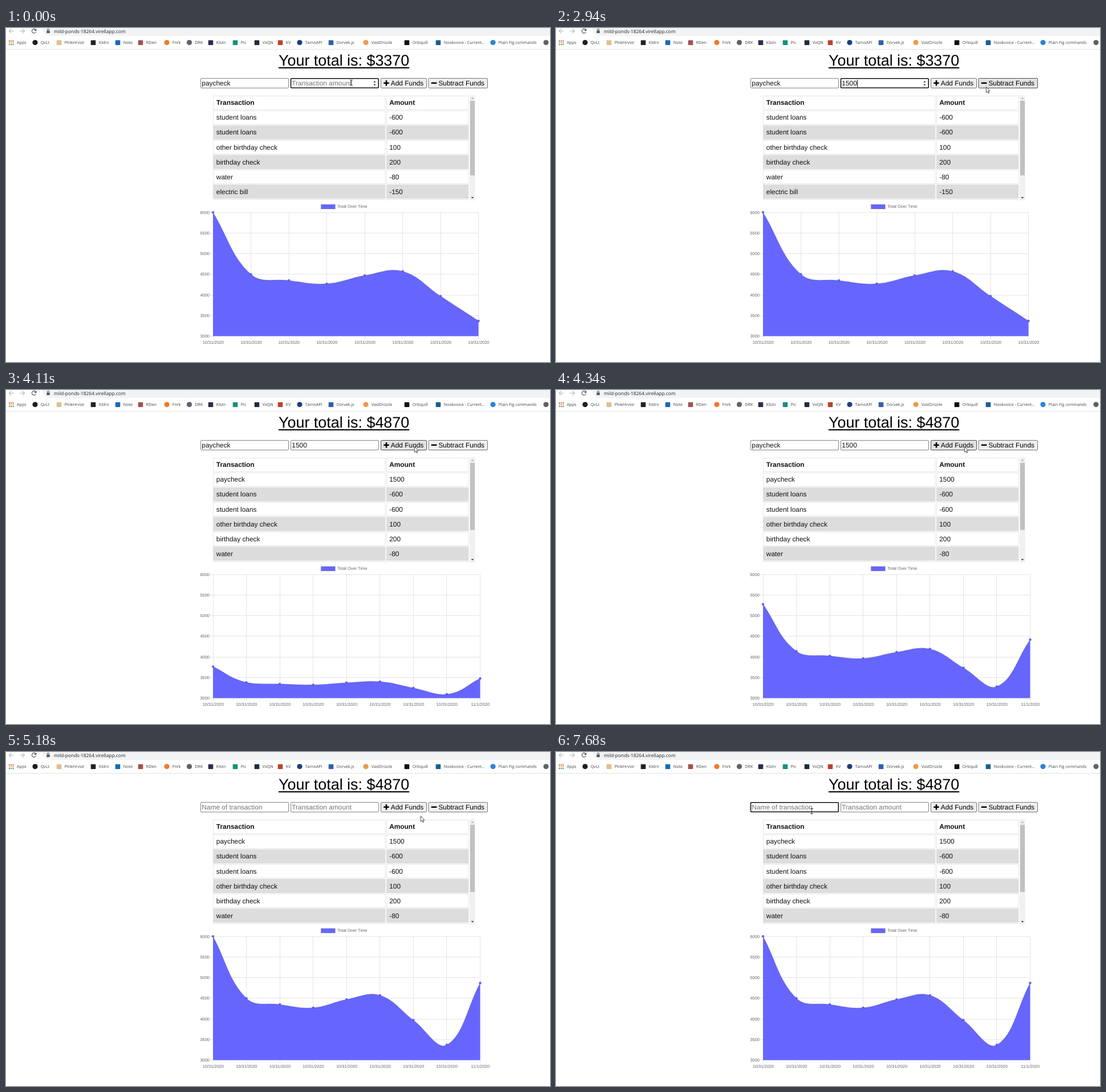
An HTML page for the animation above (8 s loop, 954x587 px).

```html
<!DOCTYPE html>
<html lang="en">
<head>
<meta charset="utf-8">
<title>Budget tracker</title>
<style>
  html, body { margin: 0; width: 100%; height: 100%; overflow: hidden; background: #fff; }
  svg { position: absolute; left: 0; top: 0; display: block; }
  text { font-family: "Liberation Sans", Arial, sans-serif; font-size: 11.9px; fill: #111; text-rendering: geometricPrecision; white-space: pre; }
  .bar text { font-family: "Open Sans", "Noto Sans", sans-serif; font-size: 7.15px; fill: #3c4043; }
  .bar .url { font-size: 8.4px; fill: #202124; }
  .chart text { font-size: 7.45px; fill: #666; }
  .head { font-weight: bold; }
  .hint { fill: #757575; }
  h1 { position: absolute; left: 478px; top: 42.3px; margin: 0; white-space: nowrap; color: #000;
       font: 26.9px/30px "Liberation Sans", Arial, sans-serif; text-rendering: geometricPrecision;
       text-decoration: underline; text-underline-offset: 2.5px; }
</style>
</head>
<body>
<h1 id="total"></h1>
<svg width="954" height="587" viewBox="0 0 954 587">
  <defs><clipPath id="pane"><rect x="360" y="118" width="464" height="185"/></clipPath></defs>
  <g class="bar" id="bar"></g>
  <g id="page"></g>
</svg>
<script>
const LOOP = 8000;
const $ = id => document.getElementById(id);
const text = (x, y, s, attrs = '') => `<text x="${x}" y="${y}" ${attrs}>${s}</text>`;
const rect = (x, y, w, h, fill, attrs = '') => `<rect x="${x}" y="${y}" width="${w}" height="${h}" fill="${fill}" ${attrs}/>`;
const path = (d, fill, attrs = '') => `<path d="${d}" fill="${fill}" ${attrs}/>`;
const circle = (x, y, r, fill, attrs = '') => `<circle cx="${x}" cy="${y}" r="${r}" fill="${fill}" ${attrs}/>`;

// ---- Browser bar ----
// icon centre, icon colour, round or square, label
const bookmarks = [
  [51, '#1b1f23', 1, 'QvLt'], [93, '#e2bd8c', 0, 'PlnkHrvstr'], [153, '#222', 0, 'Kldrn'],
  [196, '#1769b8', 0, 'Note'], [236, '#a5504c', 0, 'RDen'], [282, '#ee7b30', 1, 'Fnrk'],
  [321.5, '#5f6368', 1, 'DRK'], [359, '#33294d', 0, 'Klstn'], [402, '#16917f', 0, 'Pic'],
  [440, '#1e2c3c', 0, 'VxQN'], [481, '#b9432c', 0, 'KV'], [515, '#1d3f7f', 1, 'TarnoAPI'],
  [570, '#2f5fb3', 0, 'Dorvek.js'], [631, '#ee9a4d', 1, 'VastDrizzle'], [703, '#111', 0, 'Orbquill'],
  [758, '#195f92', 0, 'Nookvoice - Current...'], [854, '#2d83d8', 1, 'Plain Fig commands'], [947, '#5f6368', 1, '']
];

function drawBar() {
  const line = (d, color) => path(d, 'none', `stroke="${color}" stroke-width="1.1"`);
  let out = rect(64, -14, 920, 28, '#f1f3f4', 'rx="14"');
  out += line('M13.5 5.5H5.5M9.3 1.7L5.5 5.5L9.3 9.3', '#b4b6b9');
  out += line('M24.5 5.5H32.5M28.7 1.7L32.5 5.5L28.7 9.3', '#b4b6b9');
  out += line('M51.8 2.8A3.7 3.7 0 1 0 52.6 6.6', '#4a4d51') + path('M53.3 1V5H49.3Z', '#4a4d51');
  out += rect(71.3, 4.4, 5.4, 4.6, '#55585c', 'rx="0.6"') + line('M72.5 4.5V3.2A1.5 1.5 0 0 1 75.5 3.2V4.5', '#55585c');
  out += text(84, 8.7, 'mild-ponds-18264.virellapp.com', 'class="url"');
  const dots = ['#d94f41', '#e3a33a', '#4a9a5b'];
  for (let i = 0; i < 9; i++) out += rect(5 + i % 3 * 3.3, 21.8 + (i / 3 | 0) * 3.1, 2, 2, dots[i / 3 | 0]);
  out += text(19, 28.1, 'Apps');
  for (const [x, color, round, label] of bookmarks) {
    out += round ? circle(x, 25.5, 4.6, color) : rect(x - 4.3, 21.4, 8.6, 8.6, color, 'rx="1"');
    out += text(x + 9.8, 28.1, label);
  }
  return out + rect(0, 37, 954, 1, '#e1e2e4');
}

// ---- Table ----
const entries = [['student loans', -600], ['student loans', -600], ['other birthday check', 100],
  ['birthday check', 200], ['water', -80], ['electric bill', -150], ['groceries', -1500]];

function drawTable(added) {
  const rows = [['Transaction', 'Amount'], ...(added ? [['paycheck', 1500]] : []), ...entries].slice(0, 8);
  let out = '<g clip-path="url(#pane)">';
  rows.forEach(([name, amount], i) => {
    const top = Math.floor(119 + i * 26.1) + 0.5;
    const base = 135.2 + i * 26.13;
    const shaded = i > 0 && i % 2 === 0;
    const fill = shaded ? '#ddd' : '#fff';
    const look = `stroke="${shaded ? '#ddd' : '#e6e6e6'}"`;
    const type = i ? '' : 'class="head"';
    out += rect(363.5, top, 301.5, 24, fill, look) + rect(667.5, top, 143.5, 24, fill, look);
    out += text(368.8, base, name, type) + text(672.2, base, amount, type);
  });
  out += rect(813, 118, 10, 185, '#f1f1f1') + rect(814, 128, 8, added ? 118 : 131, '#c1c1c1');
  out += path('M815.6 124.5L818 122L820.4 124.5Z', '#a3a3a3') + path('M815.6 297L818 299.7L820.4 297Z', '#404040');
  return out + '</g>';
}

// ---- Chart ----
const BLUE = '#6666ff', TOP = 324, BASE = 541.6, LEFT = 363;
const BORDER = 'stroke="#000" stroke-opacity="0.1" stroke-width="1.86"';
const totals = [6000, 4500, 4350, 4270, 4470, 4570, 3970, 3370];
const snap = v => Math.floor(v) + 0.5;

// Cubic spline through the points, handles kept inside the plot.
function spline(pts, tension = 0.4) {
  const cap = y => Math.min(BASE, Math.max(TOP, y));
  const handles = pts.map((p, i) => {
    const a = pts[i - 1] || p, b = pts[i + 1] || p;
    const da = Math.hypot(p.x - a.x, p.y - a.y), db = Math.hypot(b.x - p.x, b.y - p.y);
    const ka = tension * da / (da + db), kb = tension * db / (da + db);
    return [p.x - ka * (b.x - a.x), cap(p.y - ka * (b.y - a.y)), p.x + kb * (b.x - a.x), cap(p.y + kb * (b.y - a.y))];
  });
  return pts.slice(1).map((p, i) => [...handles[i].slice(2), ...handles[i + 1].slice(0, 2), p.x, p.y]);
}

function drawChart(added, grow) {
  const values = added ? [...totals, 4870] : totals;
  const right = added ? 831.5 : 828.6;
  const step = (right - LEFT) / (values.length - 1);
  const pts = values.map((v, i) => ({ x: LEFT + i * step, y: BASE - (v - 3000) / 3000 * (BASE - TOP) }));
  const rise = y => (BASE - (BASE - y) * grow).toFixed(2);
  let out = '<g class="chart">' + rect(552.5, 310.2, 24.8, 7.8, BLUE, BORDER) + text(581.3, 316.4, 'Total Over Time');
  for (let i = 0; i < 7; i++) {
    const y = TOP + i * (BASE - TOP) / 6;
    out += path(`M357 ${snap(y)}H${right}`, 'none', 'stroke="#e5e5e5"');
    out += text(357, y + 2.5, 6000 - i * 500, 'text-anchor="end"');
  }
  pts.forEach((p, i) => {
    out += path(`M${snap(p.x)} ${TOP}V547`, 'none', 'stroke="#e5e5e5"');
    out += text(p.x + 0.3, 554.6, added && i === 8 ? '11/1/2020' : '10/31/2020', 'text-anchor="middle"');
  });
  const edge = `${LEFT} ${rise(pts[0].y)}` + spline(pts).map(c => 'C' + c.map((v, k) => k % 2 ? rise(v) : v.toFixed(2)).join(' ')).join('');
  out += path(`M${LEFT} ${BASE}L${edge}V${BASE}Z`, BLUE) + path('M' + edge, 'none', BORDER);
  for (const p of pts) out += circle(p.x, rise(p.y), 1.9, '#5c5ce8', 'stroke="#6060f4" stroke-width="0.6"');
  return out + '</g>';
}

// ---- Form ----
const within = (p, x, w) => p.x >= x && p.x <= x + w && p.y >= 88 && p.y <= 106;

function drawField(x, value, hint, focus, caret, hover, spinner) {
  let out = focus
    ? rect(x + 0.5, 88.7, 153.8, 16.6, '#fff', 'rx="1.5" stroke="#101010" stroke-width="1.6"')
    : rect(x + 0.5, 88.5, 154, 17, '#fff', `rx="1.5" stroke="${hover ? '#555' : '#858585'}"`);
  out += value ? text(x + 2.3, 101, value) : text(x + 2.3, 101, hint, 'class="hint"');
  if (caret) out += rect(x + 2 + value.length * 6.75, 91, 1, 13, '#111');
  if (spinner) out += path('M644.2 95.4L646.4 92.8L648.6 95.4ZM644.2 98.8L646.4 101.4L648.6 98.8Z', '#444');
  return out;
}

function drawButton(x, w, label, labelX, hover, pressed) {
  const fill = pressed ? '#f5f5f5' : hover ? '#e3e3e3' : '#efefef';
  const edge = pressed ? '#8d8d8d' : hover ? '#4f4f4f' : '#767676';
  return rect(x + 0.5, 88.5, w, 17, fill, `rx="1.5" stroke="${edge}"`) + text(labelX, 101, label, 'style="fill:#000"');
}

// ---- Pointer ----
// start time, x, y
const route = [
  [0, 605, 96], [2100, 625, 97], [2180, 662, 99], [2260, 700, 102], [2340, 732, 104], [2420, 754, 105],
  [2500, 768, 106], [2580, 772, 105], [2940, 754, 103], [3020, 728, 101], [3100, 716, 101], [3250, 716, 99],
  [5110, 720, 104], [5180, 727, 112], [5580, 800, 140], [5660, 867, 165], [5740, 834, 181], [5820, 801, 182],
  [6390, 802, 183], [6460, 785, 176], [6540, 736, 155], [6610, 670, 128], [6690, 600, 108], [6760, 540, 95],
  [6830, 490, 91], [6910, 460, 97], [6980, 448, 104]
];

function drawPointer(p, beam) {
  if (beam) return path(`M${p.x - 2} ${p.y - 4.5}H${p.x + 3}M${p.x + 0.5} ${p.y - 4.5}V${p.y + 4.5}M${p.x - 2} ${p.y + 4.5}H${p.x + 3}`, 'none', 'stroke="#222" stroke-width="0.9"');
  return path(`M${p.x + 0.4} ${p.y + 0.5}v9.8l2.2 -2l1.5 3.4l1.6 -0.7l-1.5 -3.3h2.9z`, '#fff', 'stroke="#222" stroke-width="0.8"');
}

// ---- Timeline ----
const between = (t, a, b) => t >= a && t < b;
const typedAt = [80, 310, 620, 850];
const FRAME = 76, ADDED = 4030, CLEARED = 4490;

function growth(t) {
  const held = Math.floor((t - ADDED) / FRAME) * FRAME;
  const u = Math.min(1, Math.max(0, (held - 5) / 1000));
  return 1 - (1 - u) ** 4;
}

function drawPage(t) {
  const added = t >= ADDED, cleared = t >= CLEARED;
  const [, x, y] = route.findLast(step => t >= step[0]);
  const p = { x, y };
  const overName = within(p, 341, 155), overAmount = within(p, 499, 155);
  const amount = cleared ? '' : '1500'.slice(0, typedAt.filter(at => t >= at).length);
  const onAmount = t < 3880, onName = t >= 7130;
  const blink = between(t, 80, 1400) || between(t, 1930, 2420) || between(t, 2940, 3480);
  const pressed = between(t, 3880, ADDED);

  let out = drawField(341, cleared ? '' : 'paycheck', 'Name of transaction', onName, between(t, 7130, 7680), overName);
  out += drawField(499, amount, 'Transaction amount', onAmount, blink, overAmount, onAmount || overAmount);
  out += drawButton(657, 80, 'Add Funds', 674.8, within(p, 657, 81), pressed);
  out += drawButton(740.5, 103.5, 'Subtract Funds', 758.4, within(p, 740, 105), false);
  out += path('M662.3 96.8H671.7M667 92.1V101.5M745.8 96.8H755.4', 'none', 'stroke="#000" stroke-width="2.5"');
  out += drawTable(added) + drawChart(added, added ? growth(t) : 1);
  if (pressed) out += circle(716.5, 100.5, 6.5, '#ffe30a', 'opacity="0.65"');
  if (between(t, 7130, 7300)) out += circle(446.5, 103.5, 7.3, '#ffe30a', 'opacity="0.65"');
  return out + drawPointer(p, overName || overAmount);
}

$('bar').innerHTML = drawBar();
const start = performance.now();
let shown = '';
function tick() {
  const t = (performance.now() - start) % LOOP;
  const next = drawPage(t);
  if (next !== shown) {
    $('page').innerHTML = shown = next;
    $('total').textContent = 'Your total is: $' + (t >= ADDED ? 4870 : 3370);
  }
  requestAnimationFrame(tick);
}
tick();
</script>
</body>
</html>
```
